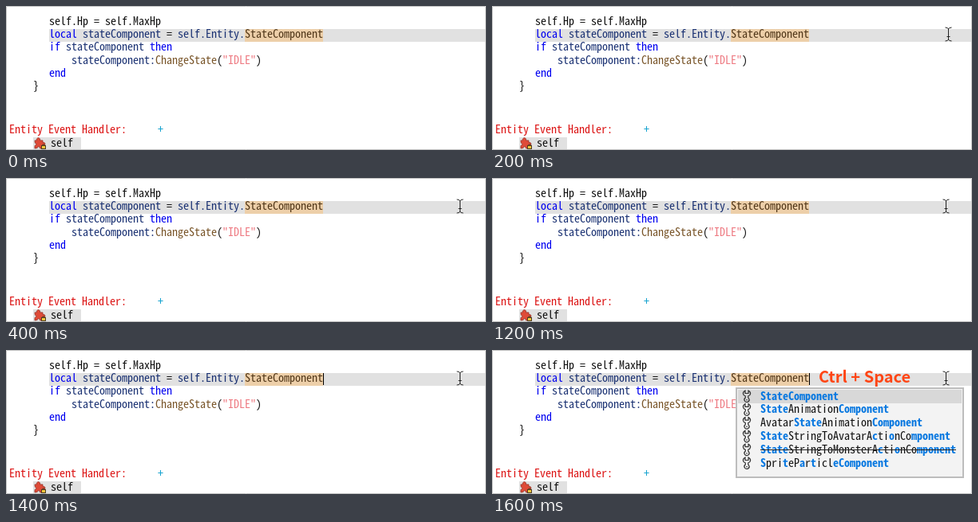
These frames come from a looping animation (601 px wide and 181 px high, 3100 ms). An HTML page with a canvas:

```html
<!DOCTYPE html>
<html lang="en">
<head>
<meta charset="utf-8">
<title>Code completion</title>
<style>
html, body { margin: 0; width: 100%; height: 100%; overflow: hidden; background: #fff; }
canvas { display: block; }
</style>
</head>
<body>
<canvas id="stage" width="601" height="181"></canvas>
<script>
const ctx = document.getElementById("stage").getContext("2d");
const LOOP = 3100;
const CELL = 7;
const FAMILY = '"Noto Sans Mono CJK KR", "Noto Sans Mono CJK JP", "Noto Sans Mono", monospace';

// Pick the size whose natural advance is one cell.
ctx.font = `100px ${FAMILY}`;
const SIZE = CELL * 100 / ctx.measureText("0").width;
const CODE = `${SIZE}px ${FAMILY}`;
const BOLD = `bold ${SIZE}px ${FAMILY}`;

const INK = "#111", NAVY = "#1b3273", BLUE = "#0000f0", BROWN = "#795529";
const PINK = "#ee7b83", RED = "#dc1414", MATCH = "#0878e0";

const lines = [
  [54, 24, [["self.Hp = self.MaxHp", INK]]],
  [54, 40, [["local ", BLUE], ["stateComponent", NAVY], [" = ", INK], ["self.Entity.", NAVY], ["StateComponent", "#513719"]]],
  [54, 56, [["if ", BLUE], ["stateComponent ", NAVY], ["then", BLUE]]],
  [82, 73, [["stateComponent:", NAVY], ["ChangeState", BROWN], ["(", INK], ['"IDLE"', PINK], [")", INK]]],
  [54, 89, [["end", BLUE]]],
  [34, 105, [["}", INK]]],
  [4, 160, [["Entity Event Handler:", RED]]],
  [190, 160, [["+", "#16a3cf"]]],
  [56, 177, [["self", INK]]]
];

// Brackets mark the letters that match the typed word.
const suggestions = [
  "[StateComponent]",
  "[State]Animation[Component]",
  "Avatar[State]Animation[Component]",
  "[State]StringToAvatarA[c]ti[o]nCo[mponent]",
  "[State]StringToMonsterA[c]ti[o]nCo[mponent]",
  "[S]pri[t]eP[a]r[t]icl[eComponent]"
];

function rect(x, y, w, h, color) {
  ctx.fillStyle = color;
  ctx.fillRect(x, y, w, h);
}

function text(value, x, y, color, font = CODE) {
  ctx.font = font;
  ctx.fillStyle = color;
  ctx.fillText(value, x, y);
}

function stroke(color, width, build) {
  ctx.strokeStyle = color;
  ctx.lineWidth = width;
  ctx.beginPath();
  build();
  ctx.stroke();
}

function drawLine([x, y, parts]) {
  for (const [value, color] of parts) {
    text(value, x, y, color);
    x += value.length * CELL;
  }
}

function drawPuzzle() {
  ctx.fillStyle = "#df4b38";
  ctx.strokeStyle = "#983126";
  ctx.lineWidth = 0.8;
  ctx.beginPath();
  ctx.moveTo(36, 169);
  ctx.lineTo(38.5, 169);
  ctx.arc(40.5, 168, 2.2, 2.7, 0.45);
  ctx.lineTo(46, 169);
  ctx.lineTo(46, 172);
  ctx.arc(47, 173.5, 2, -1.8, 1.8);
  ctx.lineTo(46, 179);
  ctx.lineTo(42.5, 179);
  ctx.arc(40.8, 178.5, 1.7, 0, Math.PI, true);
  ctx.lineTo(36, 179);
  ctx.lineTo(36, 175.5);
  ctx.arc(36.3, 173.8, 1.6, 1.5, -1.5, true);
  ctx.closePath();
  ctx.fill();
  ctx.stroke();
  stroke("#4c3b20", 1, () => ctx.arc(47, 175.5, 1.6, Math.PI, 0));
  rect(44, 175, 6, 5, "#4c3b20");
  rect(45, 176, 4, 3, "#f4c63c");
}

function drawBeam(x) {
  stroke("#222", 1, () => {
    for (const [y, bend] of [[27, 1], [44, -1]]) {
      ctx.moveTo(x - 3.5, y);
      ctx.quadraticCurveTo(x, y, x + 0.5, y + 2 * bend);
      ctx.quadraticCurveTo(x + 1, y, x + 4.5, y);
    }
    ctx.moveTo(x + 0.5, 28);
    ctx.lineTo(x + 0.5, 43);
    ctx.moveTo(x - 1.5, 38.5);
    ctx.lineTo(x + 2.5, 38.5);
  });
}

function drawWrench(x, y) {
  stroke("#303030", 1.2, () => {
    ctx.moveTo(x - 2, y - 7);
    ctx.bezierCurveTo(x - 6, y - 5, x - 5, y - 1, x - 1.7, y);
    ctx.lineTo(x - 1.7, y + 2);
    ctx.arc(x, y + 4.5, 3, -2.2, -0.94, true);
    ctx.lineTo(x + 1.7, y);
    ctx.bezierCurveTo(x + 5, y - 1, x + 6, y - 5, x + 2, y - 7);
    ctx.lineTo(x + 2, y - 3.5);
    ctx.lineTo(x - 2, y - 3.5);
    ctx.closePath();
  });
  rect(x - 0.7, y + 4, 1.4, 1.4, "#303030");
}

function drawPopup() {
  rect(305, 47, 286, 114, "#bdbdbd");
  rect(307, 49, 282, 110, "#f3f3f3");
  rect(308, 50, 280, 17, "#d8d8d8");
  suggestions.forEach((entry, row) => {
    const y = 58 + row * 16.8;
    let x = 336;
    drawWrench(319, y);
    entry.split(/[\[\]]/).forEach((part, i) => {
      text(part, x, y + 4.5, i % 2 ? MATCH : INK, i % 2 ? BOLD : CODE);
      x += part.length * CELL;
    });
    if (row === 4) rect(336, 125, x - 336, 1, "#222");
  });
}

function draw(t) {
  rect(0, 0, 601, 181, "#fff");
  rect(54, 29, 546, 16, "#e1e1e1");
  rect(299, 29, 98, 16, "#edcfa9");
  rect(34, 165, 60, 15, "#e1e1e1");
  lines.forEach(drawLine);
  drawPuzzle();

  if (t >= 200) drawBeam(t < 300 ? 571 : t < 400 ? 569 : 568);
  if ((t >= 600 && t < 1200) || t >= 1400) rect(397, 29, 1, 15, "#000");
  if (t >= 1600) {
    text("Ctrl + Space", 409, 41, "#ff4514", 'bold 20px "Noto Sans CJK KR", "Noto Sans CJK JP", "Noto Sans", sans-serif');
    drawPopup();
  }
  stroke("#c2c2c2", 1, () => ctx.rect(0.5, 0.5, 600, 180));
}

const start = performance.now();
function tick() {
  draw((performance.now() - start) % LOOP);
  requestAnimationFrame(tick);
}
draw(0);
requestAnimationFrame(tick);
</script>
</body>
</html>
```
